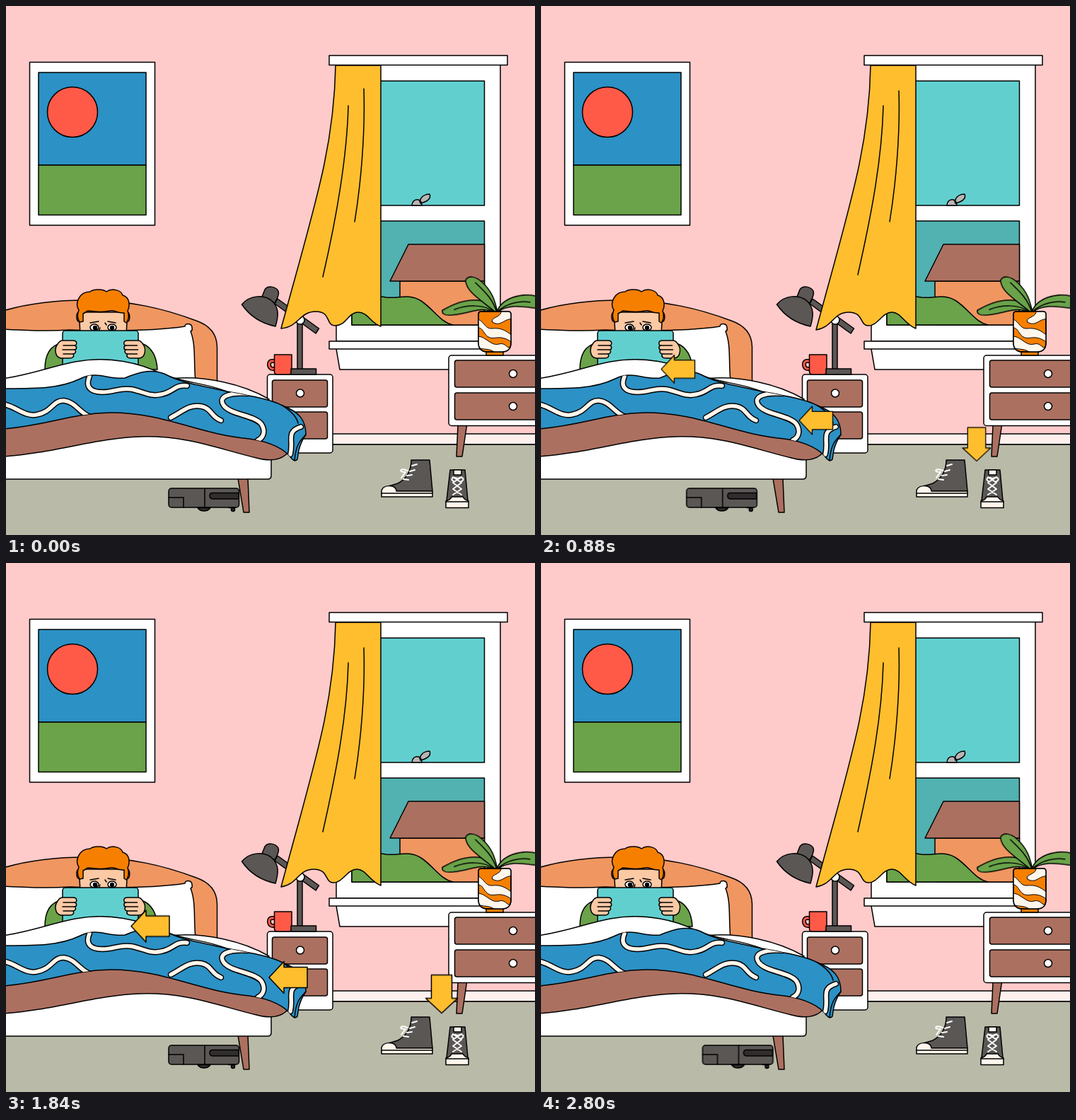
Animation, 748 px wide and 748 px high, one loop 2880 ms. Source, as an HTML page without scripts:

```html
<!DOCTYPE html>
<html lang="en">
<head>
<meta charset="utf-8">
<title>Bedroom</title>
<style>
html, body { margin: 0; width: 100%; height: 100%; overflow: hidden; background: #ffcaca; }
svg { display: block; width: 100vw; height: 100vh; }
.ink { stroke: #000; stroke-width: 1.5; stroke-linejoin: round; stroke-linecap: round; }
.none { fill: none; }
.white { fill: #fff; } .cream { fill: #fff6ec; } .brown { fill: #ac7060; }
.gray { fill: #5b5755; } .dark { fill: #302d2c; } .peach { fill: #f09661; }
.orange { fill: #f77f00; } .green { fill: #6aa34a; } .blue { fill: #2c91c5; }
.red { fill: #ff5a47; } .teal { fill: #62cfcf; } .yellow { fill: #ffbe2e; } .skin { fill: #fcc9a5; }
.lace { fill: none; stroke: #fff; stroke-width: 2; stroke-linecap: round; }

.robot { animation: roam 2880ms cubic-bezier(.37,0,.63,1) infinite; }
@keyframes roam {
  0%, 42.5%, 63.889%, 100% { transform: none; }
  19.444% { transform: translateX(-46px); }
  81.944% { transform: translateX(-28.3px); }
}

.arrows { animation: show 2880ms step-end infinite; }
@keyframes show {
  0%, 66.667% { visibility: hidden; }
  22.222% { visibility: visible; }
}
.arrow { animation: nudge 2880ms cubic-bezier(.37,0,.63,1) infinite; }
@keyframes nudge {
  0%, 19.444%, 41.667%, 63.889%, 100% { transform: none; }
  30.556%, 52.778%, 75% { transform: translateX(-10.2px) scale(.88); }
}

.eyes { transform-origin: 137px 455px; animation: blink 2880ms step-end infinite; }
@keyframes blink {
  0%, 63.889% { transform: none; }
  55.556%, 61.111% { transform: scaleY(.5); }
  58.333% { transform: scaleY(.12); }
}

.leaf { animation: sway 480ms ease-in-out -40ms infinite alternate; transform-origin: 692px 432px; }
@keyframes sway { from { transform: rotate(-.3deg); } to { transform: rotate(.7deg); } }

.curtain { animation: billow 960ms linear infinite; }
@keyframes billow {
  0%, 100% { d: path("M466 84C464 200 437 280 389 456C414 454 415 432 438 432S451 452 466 452S484 433 498 433S515 448 530 453V84Z"); }
  25% { d: path("M466 84C464 200 437 280 389 447C405 449 401 437 414 438S444 459 463 459S483 435 497 435S512 446 530 447V84Z"); }
  33.333% { d: path("M466 84C464 200 437 280 389 447C404 448 403 439 414 440S444 458 460 458S481 436 493 436S512 447 530 449V84Z"); }
  50% { d: path("M466 84C464 200 437 280 389 450C404 452 405 442 416 442S441 457 453 457S474 437 486 437S512 450 530 452V84Z"); }
  75% { d: path("M466 84C464 200 437 280 389 456C407 456 411 437 426 438S445 453 456 454S477 435 490 435S514 453 530 457V84Z"); }
  91.667% { d: path("M466 84C464 200 437 280 389 458C412 455 413 433 435 433S450 452 463 452S483 433 496 433S515 451 530 456V84Z"); }
}
.crease-a { animation: crease-a 960ms linear infinite; }
@keyframes crease-a {
  0%, 100% { d: path("M484 141C482 220 466 305 448 383"); }
  25% { d: path("M484 149C482 225 466 305 448 387"); }
  33.333% { d: path("M484 151C482 225 466 305 448 385"); }
  50% { d: path("M484 153C482 225 466 300 448 380"); }
  75% { d: path("M484 145C482 220 466 300 448 376"); }
  91.667% { d: path("M484 141C482 220 466 300 448 380"); }
}
.crease-b { animation: crease-b 960ms linear infinite; }
@keyframes crease-b {
  0%, 100% { d: path("M506 117C508 180 502 250 493 305"); }
  25% { d: path("M506 119C508 180 502 255 493 310"); }
  33.333% { d: path("M506 122C508 185 502 255 493 313"); }
  50% { d: path("M506 129C508 190 502 255 493 313"); }
  75% { d: path("M506 127C508 185 502 250 493 308"); }
  91.667% { d: path("M506 120C508 180 502 250 493 305"); }
}
</style>
</head>
<body>
<svg viewBox="0 0 748 748" class="ink">
<defs>
  <path id="arrow" class="yellow" d="M-27 0L-6-22.5V-14.5H27V14.5H-6V22.5Z"/>
  <path id="squiggles" d="M-4 563C14 566 26 581 43 578C66 574 66 557 82 558C98 560 103 574 117 580M118 524C112 538 119 546 136 546C155 546 160 539 178 542C196 546 204 553 220 549C237 546 238 535 256 537M233 582C250 573 259 563 276 566C291 569 290 581 304 586M342 548C314 546 299 553 308 565C318 578 350 578 361 591C367 600 365 610 356 614M417 595C395 602 407 614 402 634"/>
  <clipPath id="blanket-clip"><use href="#blanket"/></clipPath>
  <clipPath id="pot-clip"><use href="#pot"/></clipPath>
</defs>

<g id="room">
  <path stroke="none" fill="#ffcaca" d="M0 0H748V748H0Z"/>
  <path fill="#fff0ee" d="M-2 605H750V620H-2Z"/>
  <path fill="#babaa8" d="M-2 620H750V750H-2Z"/>
</g>

<g id="picture">
  <path class="white" d="M33.500 79.500H210.500V310H33.500Z"/>
  <path class="blue" d="M46 94H198V225H46Z"/>
  <path class="green" d="M46 225H198V295.500H46Z"/>
  <circle class="red" cx="94" cy="150" r="35.500"/>
</g>

<g id="window">
  <path class="white" d="M467 83H699V474H467Z"/>
  <path class="teal" d="M489 106H676.500V282H489Z"/>
  <path fill="#52b1b1" d="M489 304H676.500V451H489Z"/>
  <path class="peach" d="M557 389H676.500V451H557Z"/>
  <path class="brown" d="M569 337H676.500V389H543Z"/>
  <path class="green" d="M489 451V418C505 409 523 409 538 412C555 414 570 406 587 417C605 429 614 447 632 451Z"/>
  <path fill="#b9b5b4" d="M574 282C574 272 588 270 588 282ZM585 276C587 269 593 266 599 266C602 273 594 277 586 279Z"/>
  <path class="white" d="M467 485H699L694 514H472ZM457 474H709V485H457ZM457 70H709V83.500H457Z"/>
</g>

<g id="nightstand">
  <rect class="white" x="369.500" y="521" width="92.500" height="111" rx="4"/>
  <rect class="brown" x="376.500" y="529" width="78" height="38" rx="3"/>
  <rect class="brown" x="376.500" y="574" width="78" height="38" rx="3"/>
  <circle class="white" cx="416" cy="547.500" r="5.500"/>
  <path class="none" stroke-width="6" d="M380 502H376C370 502 371 513 377 513H380"/>
  <path class="none" stroke="#ff5a47" stroke-width="3" d="M380 502H376C370 502 371 513 377 513H380"/>
  <path class="red" d="M379.500 493H404V517Q404 521 400 521H383.500Q379.500 521 379.500 517Z"/>
</g>

<g id="lamp" class="gray">
  <path d="M403 513H438.500V521H403ZM412 444H419V513H412Z"/>
  <path d="M384 414L442.500 456L438 463L380 421Z"/>
  <path d="M362 411L366 401C370 395 381 396 385 403Q387 408 380 420Z"/>
  <path d="M333.500 422C344 409 365 407 376 417C387 427 385 440 381 453C362 449 345 439 333.500 422Z"/>
  <circle class="white" cx="416" cy="444" r="6"/>
</g>

<g id="drapes">
  <path class="curtain yellow" d="M466 84C464 200 437 280 389 456C414 454 415 432 438 432S451 452 466 452S484 433 498 433S515 448 530 453V84Z"/>
  <path class="crease-a none" d="M484 141C482 220 466 305 448 383"/>
  <path class="crease-b none" d="M506 117C508 180 502 250 493 305"/>
</g>

<g id="dresser">
  <path class="brown" d="M639 593H651.500L645 637H637Z"/>
  <rect class="white" x="626" y="494" width="140" height="99.500" rx="4"/>
  <rect class="brown" x="634.500" y="501" width="130" height="38" rx="3"/>
  <rect class="brown" x="634.500" y="547" width="130" height="38" rx="3"/>
  <circle class="white" cx="717" cy="520" r="5.500"/>
  <circle class="white" cx="717" cy="566" r="5.500"/>
</g>

<g id="plant">
  <g class="leaf green">
    <path d="M690 433C684 412 653 409 617 430C616 434 620 437 626 437C650 437 672 423 690 433Z"/>
    <path class="none" d="M690 433C676 420 650 423 634 429"/>
    <path d="M692 433C671 415 651 404 650 388C653 380 665 382 674 391C690 406 692 421 695 433Z"/>
    <path class="none" d="M694 433C688 413 676 403 664 391"/>
    <path d="M694 433C700 414 728 404 752 411V428C730 425 711 421 694 433Z"/>
    <path class="none" d="M694 433C709 419 728 417 741 419"/>
  </g>
  <path class="orange" d="M679 487H703V494H679Z"/>
  <path id="pot" class="orange" d="M668 436Q668 432 672 432H710Q714 432 714 436V476Q714 489 701 489H681Q668 489 668 476Z"/>
  <g clip-path="url(#pot-clip)" class="cream" stroke-width="1">
    <path d="M660 443C675 439 675 457 687 456C699 455 705 457 718 468V478C700 462 691 473 682 468C673 462 676 452 660 455Z"/>
    <path d="M688 447C683 440 702 441 700 430H718V443C705 440 700 455 688 447Z"/>
    <path d="M660 468C677 462 684 482 697 478C707 475 708 486 716 483V493H694C686 482 676 488 660 481Z"/>
  </g>
  <path class="none" d="M668 436Q668 432 672 432H710Q714 432 714 436V476Q714 489 701 489H681Q668 489 668 476Z"/>
</g>

<g id="headboard">
  <path class="peach" d="M-4 431C30 421 70 416 112 416C175 416 224 428 269 445Q298 455 298.500 482V530H-4Z"/>
  <path class="white" d="M-4 457C40 459 60 460 90 458C160 460 215 459 253 453C253 448 263 448 263 455Q264 459 261 460C269 480 265 505 268 530H-4Z"/>
</g>

<g id="reader">
  <path class="green" d="M55 514C55 492 63 480 78 477L100 514ZM214 514C213 494 205 482 192 477L165 514Z"/>
  <path class="skin" d="M104 433C99 431 98 445 104 447L105 465H170L171 447C177 445 175 431 171 433Z"/>
  <path class="orange" d="M104 447C100 441 101 435 103 430C97 421 103 404 119 404C125 399 139 401 142 404C150 398 163 402 165 409C176 412 175 425 172 431C174 437 174 443 170 448L167 446V434C157 435 153 429 147 431C135 434 124 432 116 431Q111 434 109 435V446Z"/>
  <path class="none" d="M119 448L131 446M144 446L155 448M133 455Q130 461 136 463M140 448L142 451"/>
  <g class="eyes">
    <ellipse class="white" cx="125" cy="454.500" rx="6" ry="4.500"/>
    <ellipse class="white" cx="150" cy="454.500" rx="6" ry="4.500"/>
    <circle cx="126" cy="455" r="2.500"/>
    <circle cx="150" cy="455" r="2.500"/>
  </g>
  <rect class="teal" x="80" y="459" width="107" height="60" rx="4"/>
  <g id="hand">
    <path class="skin" d="M80 473H95C101 473 101 480 97 480C101 481 100 486 97 486C100 488 98 492 95 492C97 496 94 498 90 498H78C69 497 68 484 73 478Q76 473 80 473Z"/>
    <path class="none" d="M97 480H81M97 486H80M95 492H81"/>
  </g>
  <use href="#hand" transform="matrix(-1 0 0 1 266.500 0)"/>
</g>

<g class="robot">
  <rect class="gray" x="230" y="682" width="99.500" height="27" rx="4"/>
  <path class="none" d="M230 695H251V709M281 682V709"/>
  <path class="dark" d="M329 688.500H292Q288 688.500 288 692.500T292 697H329ZM271 709.500H289Q286 714 280 714T271 709.500Z"/>
  <circle class="dark" cx="321" cy="712" r="2.500"/>
  <path class="none" d="M315 709.500H324"/>
</g>

<g id="bed">
  <path class="brown" d="M328 668H342L344 716H336Z"/>
  <path class="white" d="M-4 590H375V664Q375 669 370 669H-4Z"/>
  <path class="white" d="M225 528C280 520 338 536 372 556L340 575H225Z"/>
  <path class="white" d="M-4 527C40 520 62 510 98 503C146 494 190 505 220 520C250 533 280 532 312 545L300 580H-4Z"/>
  <path class="brown" d="M-4 592C60 570 100 565 160 570L390 610C400 620 401 630 395 635C385 643 369 643 354 639C300 626 255 607 190 609C125 611 70 632 -4 637Z"/>
  <path id="blanket" class="blue" d="M-4 541C45 541 76 541 105 527C130 515 145 529 168 526C192 516 208 513 226 521C250 534 280 537 312 545C345 551 374 556 391 565C415 574 424 586 424 606Q417 616 414 628L412 641Q409 645 404 640C395 627 374 616 344 612C269 605 225 575 148 575C90 576 60 593 -4 598Z"/>
  <g class="none" clip-path="url(#blanket-clip)">
    <use href="#squiggles" stroke-width="8.500"/>
    <use href="#squiggles" stroke="#fff6ec" stroke-width="5.500"/>
  </g>
  <path class="none" d="M424 606C417 614 410 618 408 643M391 565C402 572 411 580 413 590"/>
</g>

<g id="shoes">
  <path class="gray" d="M573 642H599L603 686H532C533 679 543 679 554 675C567 668 573 657 573 642Z"/>
  <path class="cream" d="M531 694V685C533 679 540 678 546 679Q552 681 552 686H603V694Z"/>
  <path class="none" d="M531 689H603"/>
  <path class="lace" d="M574 650L581 648M571 658L578 656M567 664L574 663M562 669L569 670M568 657C556 652 555 660 565 659L559 667"/>
  <path class="gray" d="M628 656H649L653 699H623Z"/>
  <path class="cream" d="M622 709.500V700Q629 698 630 694H646Q648 698 654 700V709.500ZM633 656H644V663H633Z"/>
  <path class="none" d="M622 701H654"/>
  <path class="lace" d="M632 666L644 674L632 683L644 691M644 666L632 674L644 683L632 691M638 668C629 664 629 671 633 672M639 668C648 664 648 671 644 672"/>
</g>

<g class="arrows">
  <g transform="translate(204 513.500)"><use href="#arrow" class="arrow"/></g>
  <g transform="translate(399 586)"><use href="#arrow" class="arrow"/></g>
  <g transform="translate(616 609.500) rotate(-90)"><use href="#arrow" class="arrow"/></g>
</g>
</svg>
</body>
</html>
```
